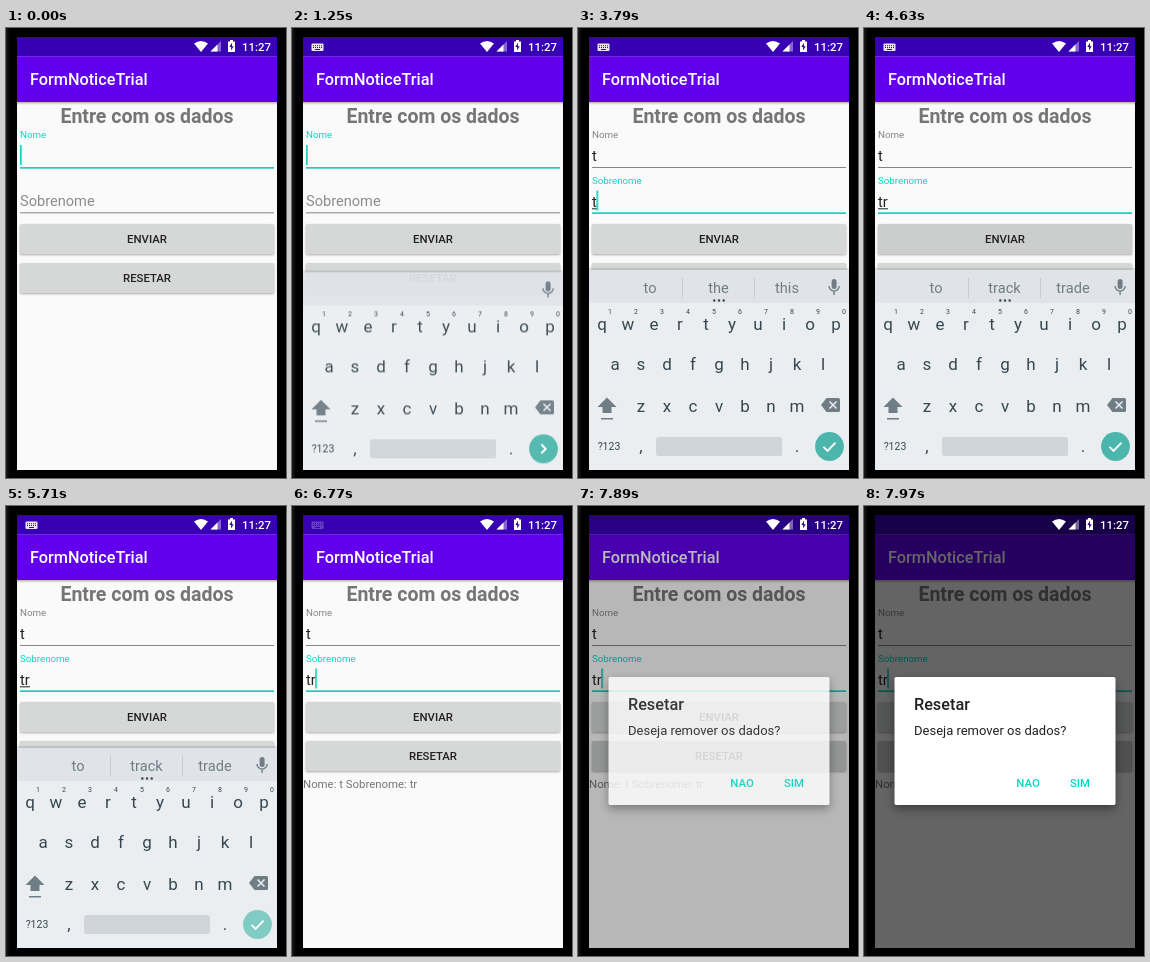
An HTML page that plays this animation: 280x450 px, repeating every 8 s.

```html
<!DOCTYPE html>
<html lang="pt">
<head>
<meta charset="utf-8">
<title>Form with confirmation dialog</title>
<style>
html, body { margin: 0; width: 100%; height: 100%; overflow: hidden; background: #000; }
svg { display: block; width: 280px; height: 450px; font-family: Roboto, sans-serif; }
svg * { animation: 8s step-end infinite; }
.mid { text-anchor: middle; }
.med { font-weight: 500; }
.s10 { font-size: 9.75px; }
.s11 { font-size: 11.4px; }
.s15 { font-size: 14.6px; }
.s16 { font-size: 16.25px; }
.teal { fill: #03dac5; }
.ink { fill: #212121; }
.button { fill: #d6d7d7; filter: drop-shadow(0 1px 1px rgba(0,0,0,.32)); }
.press { fill: #000; fill-opacity: .06; }
.keys { fill: #37474f; font-size: 17px; }
.soft { fill: #6f7d85; }

/* Percentages are ms / 80 */
#nameEmpty { animation-name: nameEmpty; }
@keyframes nameEmpty { 0% {opacity:1} 3.375% {opacity:0} 9.625% {opacity:1} 21.75% {opacity:0} 100% {opacity:0} }
#nameEnd { animation-name: nameEnd; }
@keyframes nameEnd { 0% {opacity:0} 24.25% {opacity:1} 30.375%, 100% {opacity:0} }
#lastEmpty { animation-name: lastEmpty; }
@keyframes lastEmpty { 0% {opacity:0} 34.25% {opacity:1} 40%, 100% {opacity:0} }
#lastMid { animation-name: lastMid; }
@keyframes lastMid { 0% {opacity:0} 45.125% {opacity:1} 49.875%, 100% {opacity:0} }
#lastEnd { animation-name: lastEnd; }
@keyframes lastEnd {
  0% {opacity:0} 49.875% {opacity:1} 57.875% {opacity:0} 63% {opacity:1} 68.875% {opacity:0}
  74% {opacity:1} 78.375% {opacity:0} 84.625% {opacity:1} 91% {opacity:0} 97.375%, 100% {opacity:1}
}

#nameText { animation-name: nameText; }
@keyframes nameText { 0% {opacity:0} 24.25%, 100% {opacity:1} }
#nameMark { animation-name: nameMark; }
@keyframes nameMark { 0% {opacity:0} 24.25% {opacity:1} 33.5%, 100% {opacity:0} }
#lastT { animation-name: lastT; }
@keyframes lastT { 0% {opacity:0} 45.125%, 100% {opacity:1} }
#lastR { animation-name: lastR; }
@keyframes lastR { 0% {opacity:0} 49.875%, 100% {opacity:1} }
#lastMark { animation-name: lastMark; }
@keyframes lastMark { 0% {opacity:1} 72%, 100% {opacity:0} }

#nameLabel { animation-name: nameLabel; }
@keyframes nameLabel { 0% {fill:#03dac5} 33.5%, 100% {fill:#858585} }
#nameLine { animation-name: nameLine; }
@keyframes nameLine { 0% {fill:#1ccfbd;height:1.7px} 33.5%, 100% {fill:#858585;height:1px} }
#lastLine { animation-name: lastLine; }
@keyframes lastLine { 0% {fill:#858585;height:1px} 32.875%, 100% {fill:#1ccfbd;height:1.7px} }
#lastLabel { animation-name: lastLabel; animation-timing-function: linear; }
@keyframes lastLabel {
  0%, 33.5% { transform: translate(14px,177.5px); fill: #8c8c8c; animation-timing-function: ease-out; }
  36.6%, 100% { transform: translate(14px,155.5px) scale(.667); fill: #03dac5; }
}

#sendPress { animation-name: sendPress; animation-timing-function: linear; }
@keyframes sendPress { 0%, 55.9% {opacity:0} 56% {opacity:.4} 59.1% {opacity:1} 63%, 100% {opacity:0} }
#resetPress { animation-name: resetPress; animation-timing-function: linear; }
@keyframes resetPress { 0%, 94.4% {opacity:0} 94.5% {opacity:.5} 95.125%, 100% {opacity:1} }
#result { animation-name: result; }
@keyframes result { 0% {opacity:0} 57.875%, 100% {opacity:1} }

#board { animation-name: board; }
@keyframes board {
  0% { opacity: 0; transform: translateY(40px); }
  11.5% { opacity: 0; transform: translateY(40px); animation-timing-function: ease-out; }
  16.625% { opacity: 1; transform: none; }
  71.75% { opacity: 1; transform: none; animation-timing-function: ease-in; }
  74%, 100% { opacity: 0; transform: translateY(40px); }
}
#boardIcon { animation-name: boardIcon; }
@keyframes boardIcon { 0% {opacity:0} 12.125% {opacity:.9} 72% {opacity:.25} 97.375%, 100% {opacity:0} }
#hints { animation-name: hints; }
@keyframes hints { 0% {opacity:0} 25.875% {opacity:1} 35% {opacity:0} 47.375%, 100% {opacity:1} }
#words1 { animation-name: words1; }
@keyframes words1 { 0% {opacity:1} 51.5%, 100% {opacity:0} }
#words2 { animation-name: words2; }
@keyframes words2 { 0% {opacity:0} 51.5%, 100% {opacity:1} }
#popT { animation-name: popT; }
@keyframes popT { 0% {opacity:0} 23.625% {opacity:1} 25.125% {opacity:0} 44.5% {opacity:1} 46.625%, 100% {opacity:0} }
#popR { animation-name: popR; }
@keyframes popR { 0% {opacity:0} 49.25% {opacity:1} 50.75%, 100% {opacity:0} }
#next { animation-name: next; }
@keyframes next { 0% {opacity:1} 35.875%, 100% {opacity:0} }
#done { animation-name: done; }
@keyframes done { 0% {opacity:0} 35.875%, 100% {opacity:1} }
#action { animation-name: action; }
@keyframes action { 0% {fill:#4db6ac} 71.375%, 100% {fill:#80cbc4} }

#dim { animation-name: dim; animation-timing-function: linear; }
@keyframes dim { 0%, 97.3% {opacity:0} 97.4% {opacity:.04} 98.625% {opacity:.265} 99.6%, 100% {opacity:.6} }
#dialog { animation-name: dialog; animation-timing-function: linear; }
@keyframes dialog { 0%, 97.3% {opacity:0} 97.4% {opacity:.15} 98.625% {opacity:.82} 99.6%, 100% {opacity:1} }
</style>
</head>
<body>
<svg viewBox="0 0 280 450">
  <defs>
    <clipPath id="screen"><rect x="11" y="9" width="260" height="433"/></clipPath>
    <linearGradient id="shade" x2="0" y2="1">
      <stop stop-opacity=".28"/><stop offset="1" stop-opacity="0"/>
    </linearGradient>
    <linearGradient id="edge">
      <stop stop-color="#1c1c1c"/><stop offset="1" stop-color="#000"/>
    </linearGradient>
    <rect id="caret" width="1.7" height="20" fill="#1ccfbd"/>
  </defs>
  <rect width="280" height="450"/>
  <rect width="4" height="450" fill="url(#edge)"/>

  <g clip-path="url(#screen)">
    <rect x="11" y="9" width="260" height="433" fill="#fafafa"/>
    <rect x="11" y="74" width="260" height="3" fill="url(#shade)"/>
    <rect x="11" y="9" width="260" height="19.5" fill="#3700b3"/>
    <rect x="11" y="28.3" width="260" height="45.7" fill="#6200ee"/>
    <text x="24" y="57" class="s16 med" fill="#fff">FormNoticeTrial</text>
    <text x="141" y="95" class="mid" font-size="19.5" font-weight="700" fill="#757575">Entre com os dados</text>

    <!-- First field -->
    <text id="nameLabel" x="14" y="109.7" class="s10">Nome</text>
    <g id="nameText">
      <text x="14" y="133" class="s15 ink">t</text>
      <rect id="nameMark" x="14" y="134.8" width="5" height="1" class="ink"/>
    </g>
    <rect id="nameLine" x="14" y="139" width="254" height="1"/>
    <use id="nameEmpty" href="#caret" x="14" y="117"/>
    <use id="nameEnd" href="#caret" x="18.4" y="117"/>

    <!-- Second field -->
    <text id="lastLabel" class="s15">Sobrenome</text>
    <text x="14" y="178.5" class="s15 ink"><tspan id="none"></tspan></text>
    <g class="s15 ink">
      <g id="lastT">
        <text x="14" y="178.5">t</text>
        <rect id="lastMark" x="14" y="180.3" width="5" height="1"/>
      </g>
      <g id="lastR">
        <text x="18.8" y="178.5">r</text>
        <g id="lastMarkR"><rect x="19" y="180.3" width="5" height="1" style="animation-name:lastMark"/></g>
      </g>
    </g>
    <rect id="lastLine" x="14" y="184.3" width="254" height="1"/>
    <use id="lastEmpty" href="#caret" x="14" y="162.5"/>
    <use id="lastMid" href="#caret" x="18.4" y="162.5"/>
    <use id="lastEnd" href="#caret" x="23.2" y="162.5"/>

    <!-- Buttons -->
    <g class="s11 med mid ink">
      <rect class="button" x="14" y="196" width="254" height="30" rx="1.6"/>
      <rect id="sendPress" class="press" x="14" y="196" width="254" height="30" rx="1.6"/>
      <text x="141" y="215">ENVIAR</text>
      <rect class="button" x="14" y="235" width="254" height="30" rx="1.6"/>
      <rect id="resetPress" class="press" x="14" y="235" width="254" height="30" rx="1.6"/>
      <text x="141" y="254">RESETAR</text>
    </g>
    <text id="result" x="11" y="282" class="s11" fill="#757575">Nome: t Sobrenome: tr</text>

    <!-- Keyboard -->
    <g id="board">
      <rect x="11" y="240" width="260" height="2" fill-opacity=".1"/>
      <rect x="11" y="242" width="260" height="200" fill="#eaeef1"/>
      <rect x="11" y="242" width="260" height="33" fill="#e0e4e8"/>
      <g id="hints" class="s15 mid soft">
        <path d="M104.5 250V270M176.5 250V270" stroke="#c6ccd0"/>
        <text x="72" y="265">to</text>
        <g id="words1"><text x="140.5" y="265">the</text><text x="209" y="265">this</text></g>
        <g id="words2"><text x="140.5" y="265">track</text><text x="209" y="265">trade</text></g>
        <path d="M136.3 272.5h0M141 272.5h0M145.7 272.5h0" stroke="#37474f" stroke-width="2.5" stroke-linecap="round"/>
      </g>
      <rect x="253.6" y="251" width="5" height="10" rx="2.5" class="soft"/>
      <path d="M251 258a5 5 0 0 0 10.2 0M256.1 263.2V267" fill="none" stroke="#6f7d85" stroke-width="1.4"/>

      <g class="keys mid">
        <text y="301.5" x="24 50 76 102 128 154 180 206 232 258">qwertyuiop</text>
        <text y="286" x="32 58 84 110 136 162 188 214 240 266" font-size="7">1234567890</text>
        <text y="342" x="37 63 89 115 141 167 193 219 245">asdfghjkl</text>
        <text y="383.5" x="63 89 115 141 167 193 219">zxcvbnm</text>
        <text y="424" x="63 219">,.</text>
        <text y="422" x="31" font-size="10.5">?123</text>
      </g>
      <path class="soft" d="M29 369.5l9.5 9.5h-5v6h-9v-6h-5zM23 390h12v1.6h-12z"/>
      <path class="soft" d="M248.5 370h12q1.5 0 1.5 1.5v11q0 1.500-1.500 1.500h-12l-5.500-7z"/>
      <path d="M251.500 373.500l7 7m0-7l-7 7" stroke="#eaeef1" stroke-width="1.500"/>
      <rect x="78" y="409" width="126" height="19" rx="2.500" fill="#d0d5d9"/>
      <circle id="action" cx="251.500" cy="418.500" r="14.400"/>
      <g fill="none" stroke="#fff" stroke-width="1.900">
        <path id="next" d="M249.300 414l4.500 4.500l-4.500 4.500"/>
        <path id="done" d="M245.500 418.800l4 4l8-8.200"/>
      </g>
      <g class="mid" font-size="20" fill="#37474f">
        <g id="popT"><rect x="115" y="244" width="26" height="72" rx="3" fill="#fafbfb"/><text x="128" y="270">t</text></g>
        <g id="popR"><rect x="89" y="244" width="26" height="72" rx="3" fill="#fafbfb"/><text x="102" y="270">r</text></g>
      </g>
    </g>

    <!-- Dialog -->
    <rect id="dim" x="11" y="9" width="260" height="433"/>
    <g id="dialog">
      <rect x="30.500" y="171" width="221" height="128" rx="1.800" fill="#fff" style="filter:drop-shadow(0 4px 5px rgba(0,0,0,.4))"/>
      <text x="50" y="203.500" class="s16 med ink">Resetar</text>
      <text x="50" y="229" font-size="13" class="ink">Deseja remover os dados?</text>
      <g class="s11 med mid teal">
        <text x="164" y="281">NAO</text>
        <text x="216" y="281">SIM</text>
      </g>
    </g>

    <!-- Status bar -->
    <g fill="#fff">
      <path d="M188 15.500Q195 10.300 202 15.500L195 24z"/>
      <path d="M215 13v10.500h-10.500z" fill-opacity=".4"/>
      <path d="M211.500 16.500v7h-7z"/>
      <path d="M222 13.500h2v-1.500h3v1.500h2v10.500h-7z"/>
      <path d="M226 14.800l-2.700 4.200h1.800v3.500l2.600-4.300h-1.700z" fill="#3700b3"/>
      <text x="236" y="23" class="s11 med">11:27</text>
      <g id="boardIcon">
        <rect x="19.500" y="15.500" width="12" height="7.500" rx="1"/>
        <path d="M21 17.700h9.500M21 19.500h9.500" stroke="#3700b3" stroke-dasharray="1 1"/>
        <path d="M23 21.500h5" stroke="#3700b3"/>
      </g>
    </g>
  </g>
</svg>
</body>
</html>
```
